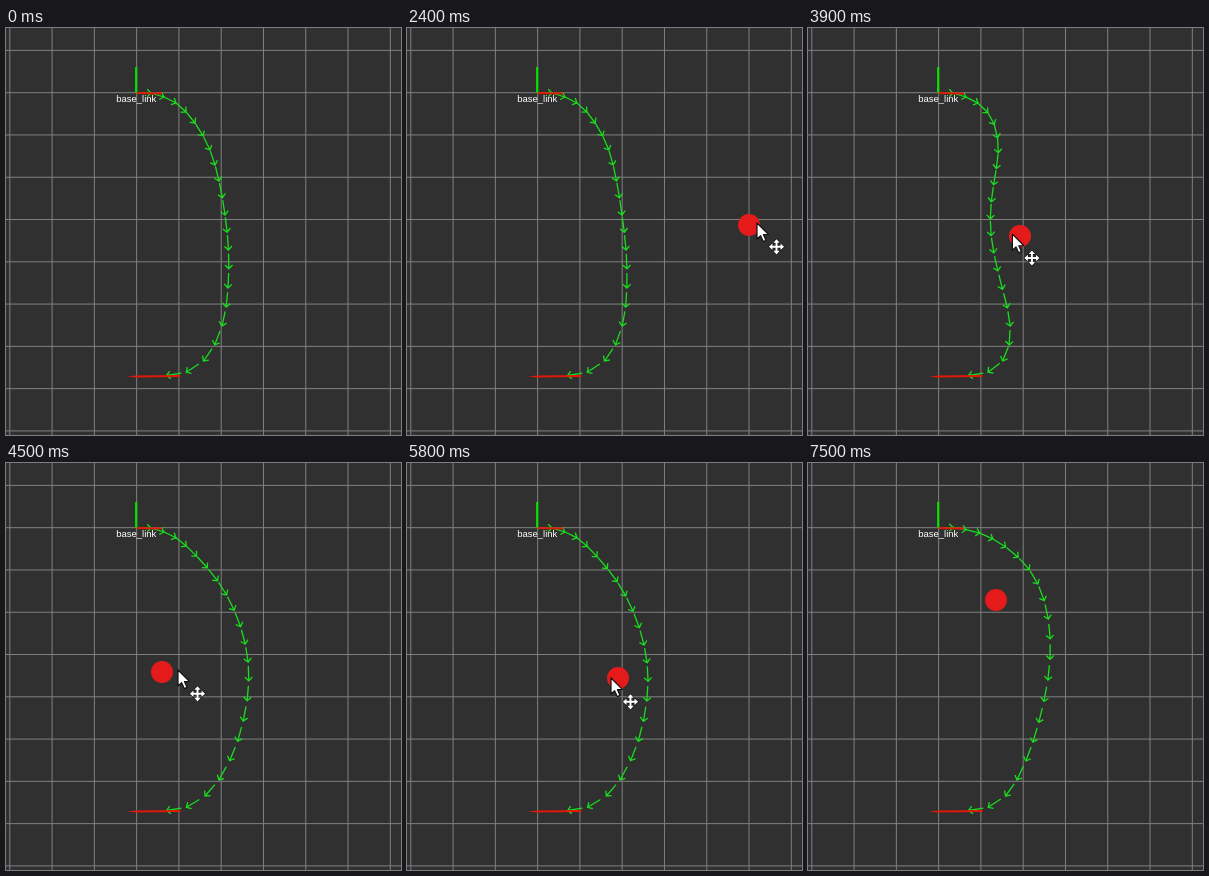
These frames come from a looping animation (395x407 px, 8 s). An HTML page with a canvas:

```html
<!DOCTYPE html>
<html lang="en">
<head>
<meta charset="utf-8">
<title>Path planning around an obstacle</title>
<style>
  html, body { margin: 0; width: 100%; height: 100%; overflow: hidden; background: #303030; }
  canvas { display: block; }
</style>
</head>
<body>
<canvas id="stage" width="395" height="407"></canvas>
<script>
const ctx = document.getElementById('stage').getContext('2d');
const W = 395, H = 407, LOOP = 8000, STEP = 100, POSES = 21, CELL = 42.28;
const DRAG_START = 2000, DRAG_END = 7500;

// Undisturbed path: every second arrow tip, with a guide point at each end
const knots = [
  [118, 61], [145, 65], [170, 75], [189, 95], [204, 122], [213, 153], [219, 187],
  [222.5, 222], [222, 260], [216, 298], [197.5, 333], [160.5, 347.5], [122, 318]
];

// The obstacle bends the path: time, push sideways, push down, pose pushed most
const bends = [
  [1000, 0, 0, 11], [1800, 1, 0, 11], [2400, -4, 0, 10], [3200, -20.5, 3, 10.5],
  [3900, -38, 4, 11], [4000, 16, -5, 11], [4500, 21, -6, 11], [5200, 10, -3, 11],
  [5800, 19, -5, 11.2], [6000, 30, -6, 11], [6700, 13, -5, 10.7], [7100, 24, -16, 9]
];

// Mouse track: time, x, y
const mouse = [
  [1900, 402, 192], [2300, 346, 195], [2400, 350, 195], [3100, 274, 205], [3300, 274, 205],
  [4300, 158, 207], [4400, 160, 207], [4500, 172, 207], [4700, 228, 208], [5000, 14, 210],
  [5600, 226, 211], [5800, 204, 215], [6300, 132, 163], [6600, 170, 157], [6700, 160, 167],
  [6900, 160, 162], [7000, 192, 135], [7300, 192, 135], [7400, 322, 58]
];

const mix = (a, b, k) => a + (b - a) * k;

// Values of a key list at a time, held before the first and after the last key
function valuesAt(keys, t) {
  const next = keys.findIndex(key => key[0] > t);
  if (next === 0) return keys[0].slice(1);
  if (next < 0) return keys[keys.length - 1].slice(1);
  const a = keys[next - 1], b = keys[next], k = (t - a[0]) / (b[0] - a[0]);
  return a.slice(1).map((v, i) => mix(v, b[i + 1], k));
}

function bump(distance, reach) {
  return Math.abs(distance) < reach ? Math.cos(Math.PI / 2 * distance / reach) ** 2 : 0;
}

function restTip(i) {
  const n = Math.floor(i / 2) + 1;
  if (i % 2 === 0) return knots[n];
  return [0, 1].map(c =>
    (9 * (knots[n][c] + knots[n + 1][c]) - knots[n - 1][c] - knots[n + 2][c]) / 16);
}

function line(x1, y1, x2, y2, color, width) {
  ctx.strokeStyle = color;
  ctx.lineWidth = width;
  ctx.beginPath();
  ctx.moveTo(x1, y1);
  ctx.lineTo(x2, y2);
  ctx.stroke();
}

function polygon(points, x = 0, y = 0) {
  ctx.beginPath();
  points.forEach(([px, py]) => ctx.lineTo(x + px, y + py));
  ctx.closePath();
}

function drawArrow(x, y, angle) {
  ctx.save();
  ctx.translate(x, y);
  ctx.rotate(angle);
  ctx.strokeStyle = '#1bdc1f';
  ctx.lineWidth = 1.3;
  ctx.beginPath();
  ctx.moveTo(-15, 0);
  ctx.lineTo(0, 0);
  ctx.moveTo(-3.8, -3.8);
  ctx.lineTo(0, 0);
  ctx.lineTo(-3.8, 3.8);
  ctx.stroke();
  ctx.restore();
}

function drawPath(t) {
  const [push, drop, peak] = valuesAt(bends, t);
  let last = [130, 65];
  for (let i = 0; i < POSES; i++) {
    const [restX, restY] = restTip(i);
    const x = restX + push * bump(i - peak, 8.5);
    const y = restY + drop * bump(i - peak + 2, 8);
    drawArrow(x, y, Math.atan2(y - last[1], x - last[0]));
    last = [x, y];
  }
}

function drawGrid() {
  ctx.fillStyle = '#303030';
  ctx.fillRect(0, 0, W, H);
  for (let i = 0; i < 10; i++) {
    const x = 3.8 + i * CELL, y = 22.4 + i * CELL;
    line(x, 0, x, H, '#808080', 1);
    line(0, y, W, y, '#808080', 1);
  }
}

function drawAxes() {
  line(130.5, 65, 156, 65.6, '#dc1a08', 2);
  line(130.2, 39, 130.2, 64.5, '#08e108', 2.2);
}

function drawGoal() {
  ctx.fillStyle = '#e01808';
  polygon([[121, 348.4], [130, 347.4], [174.5, 347], [174.5, 349], [130, 349.5]]);
  ctx.fill();
}

function drawLabel() {
  ctx.fillStyle = '#fff';
  ctx.font = '9.5px "Liberation Sans", Arial, sans-serif';
  ctx.textAlign = 'center';
  ctx.fillText('base_link', 130.3, 74);
}

function drawPointer(x, y) {
  ctx.lineJoin = 'round';
  ctx.strokeStyle = '#111';
  ctx.fillStyle = '#fff';
  ctx.lineWidth = 1.2;
  polygon([[0, 0], [0, 16], [3.6, 12.7], [6.3, 18.6], [9, 17.4], [6.4, 11.6], [11.3, 11.3]], x, y);
  ctx.fill();
  ctx.stroke();
  drawMoveSign(x + 19.5, y + 23.8);
  ctx.lineJoin = 'miter';
}

function drawMoveSign(x, y) {
  let arm = [[1, -1], [1, -4], [3.2, -4], [0, -7.6], [-3.2, -4], [-1, -4], [-1, -1]];
  const sign = [];
  for (let i = 0; i < 4; i++) {
    sign.push(...arm);
    arm = arm.map(([px, py]) => [py, -px]);
  }
  polygon(sign, x, y);
  ctx.stroke();
  ctx.fill();
}

// The obstacle trails the mouse by one step
function drawDrag(t) {
  if (t < DRAG_START) return;
  const [x, y] = valuesAt(mouse, Math.min(t - STEP, 7300));
  ctx.fillStyle = '#e51a1a';
  ctx.beginPath();
  ctx.arc(x - 4, y + 2, 11, 0, 2 * Math.PI);
  ctx.fill();
  if (t < DRAG_END) drawPointer(...valuesAt(mouse, t));
}

function draw(now) {
  const t = Math.floor((now % LOOP) / STEP) * STEP;
  drawGrid();
  drawPath(t);
  drawAxes();
  drawGoal();
  drawLabel();
  drawDrag(t);
}

let start;
function tick(now) {
  start ??= now;
  draw(now - start);
  requestAnimationFrame(tick);
}
draw(0);
requestAnimationFrame(tick);
</script>
</body>
</html>
```
